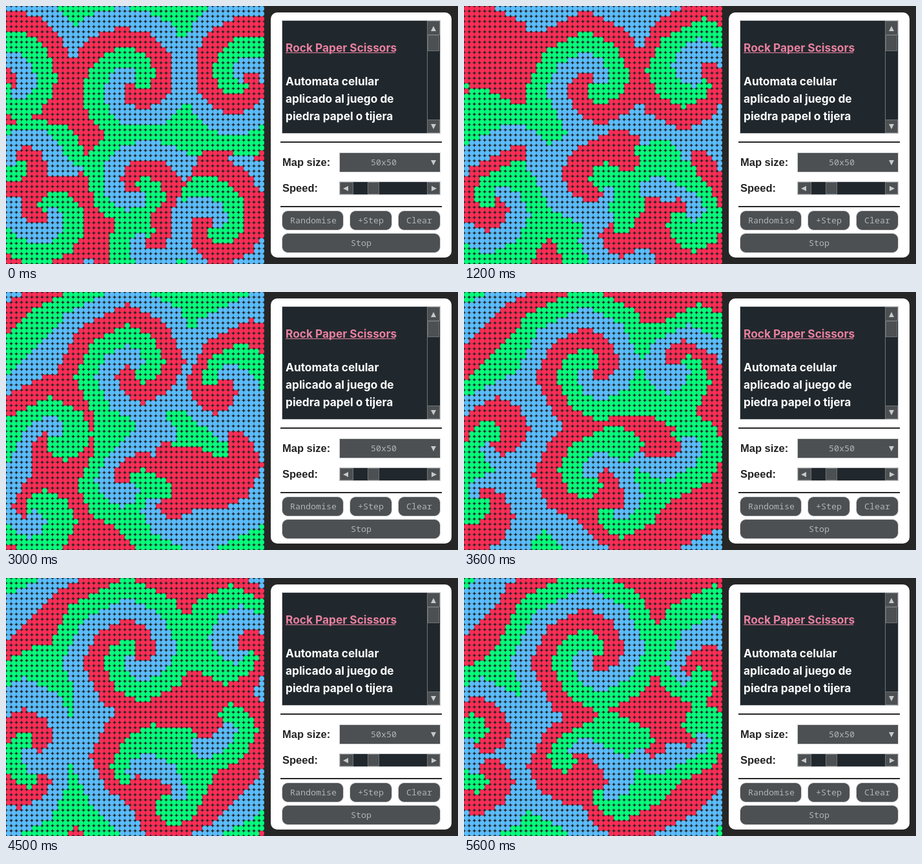
An HTML page with a canvas that plays this animation: 700x400 px, repeating every 5.7 s.

```html
<!DOCTYPE html>
<html lang="es">
<head>
<meta charset="utf-8">
<title>Rock Paper Scissors</title>
<style>
  html, body { margin: 0; width: 100%; height: 100%; overflow: hidden; background: #262626; }
  canvas, svg { position: absolute; left: 0; top: 0; display: block; }
  .pane { fill: #21282d; stroke: #c4c6c8; }
  .part { fill: #4c5052; stroke: #707476; }
  .button { fill: #4c5052; stroke: #d2d4d5; }
  .arrow { fill: #c6c8c9; }
  .rule { fill: #262626; }
  .about { font: 700 17.3px Inter, sans-serif; fill: #fff; }
  .link { fill: #e8809f; }
  .label { font: 700 16.5px "Liberation Sans", Arial, sans-serif; fill: #222; }
  .mono { font: 13.33px "Noto Sans Mono", monospace; fill: #b0b4b6; }
  .mid { text-anchor: middle; }
</style>
</head>
<body>
<canvas id="board" width="400" height="400"></canvas>
<svg width="700" height="400" viewBox="0 0 700 400">
  <rect x="410" y="10" width="280" height="380" rx="10" fill="#fff"/>

  <rect class="pane" x="427.5" y="22.5" width="245" height="175"/>
  <g class="about">
    <text class="link" x="433" y="71">Rock Paper Scissors</text>
    <rect class="link" x="433" y="72" width="170" height="1"/>
    <text x="433" y="123">Automata celular</text>
    <text x="433" y="150">aplicado al juego de</text>
    <text x="433" y="177">piedra papel o tijera</text>
  </g>
  <path d="M652.5 23V197" stroke="#707476"/>
  <rect class="part" x="652.5" y="23.5" width="19" height="21"/>
  <rect class="part" x="653.5" y="45.5" width="17" height="24"/>
  <rect class="part" x="652.5" y="176.5" width="19" height="20"/>
  <path class="arrow" d="M658 39h8l-4-8zM658 183h8l-4 8z"/>

  <rect class="rule" x="425" y="210" width="250" height="2"/>
  <text class="label" x="428" y="248">Map size:</text>
  <rect class="button" x="516.5" y="227.5" width="156" height="30"/>
  <text class="mono mid" x="585" y="247">50x50</text>
  <path class="arrow" d="M658 239h8l-4 8z"/>

  <text class="label" x="428" y="288">Speed:</text>
  <rect class="pane" x="516.5" y="272.5" width="156" height="20"/>
  <rect class="part" x="517.5" y="273.5" width="20" height="18"/>
  <rect class="part" x="560.5" y="273.5" width="17" height="18"/>
  <rect class="part" x="652.5" y="273.5" width="19" height="18"/>
  <path class="arrow" d="M530 279v8l-8-4zM659 279v8l8-4z"/>

  <rect class="rule" x="425" y="310" width="250" height="2"/>
  <rect class="button" x="427.5" y="317.5" width="95" height="30" rx="9"/>
  <rect class="button" x="532.5" y="317.5" width="65" height="30" rx="9"/>
  <rect class="button" x="607.5" y="317.5" width="65" height="30" rx="9"/>
  <rect class="button" x="427.5" y="352.5" width="245" height="30" rx="9"/>
  <clipPath id="fit"><rect x="438" y="318" width="73" height="29"/></clipPath>
  <g class="mono">
    <text x="440" y="337" clip-path="url(#fit)">Randomise</text>
    <text class="mid" x="565" y="337">+Step</text>
    <text class="mid" x="640" y="337">Clear</text>
    <text class="mid" x="550" y="372">Stop</text>
  </g>
</svg>
<script>
const SIZE = 50, CELL = 8;
const COLORS = ['#fa2d55', '#05fc7b', '#5abcfc'];
const TICK = 100, LOOP = 5700, PAUSE = 2400, RESUME = 3000;
const RATE = 2.5;        // generations per tick
const WAVELENGTH = 12;   // cells between two fronts of one colour

// Spiral centres in cells, sense of rotation, phase in turns.
const SPIRALS = [
  { x: 24.75, y: 15, spin: -1, phase: 0.62 },
  { x: 46, y: 14.3, spin: 1, phase: 0.28 },
  { x: 25.6, y: 35.6, spin: 1, phase: 0.72 },
  { x: 27, y: 45, spin: -1, phase: 0.4 },
  { x: 40, y: 42.5, spin: -1, phase: 0.85 },
  { x: 8, y: 40, spin: 1, phase: 0.9 },
  { x: 2.5, y: 30, spin: 1, phase: 0.42 },
  { x: 1, y: 16, spin: -1, phase: 0.03 }
];

// Blend the waves of all spirals; the nearest one dominates.
function seedCell(x, y) {
  let re = 0, im = 0;
  for (const s of SPIRALS) {
    const dx = x - s.x, dy = y - s.y, r = Math.hypot(dx, dy);
    const angle = s.spin * Math.atan2(dy, dx) + 2 * Math.PI * (s.phase - r / WAVELENGTH);
    const weight = Math.exp(-r / 1.5);
    re += weight * Math.cos(angle);
    im += weight * Math.sin(angle);
  }
  const turn = Math.atan2(im, re) / (2 * Math.PI) + 1;
  return Math.floor(turn * 3) % 3;
}

function seed() {
  return Uint8Array.from({ length: SIZE * SIZE },
    (_, i) => seedCell(i % SIZE + 0.5, Math.floor(i / SIZE) + 0.5));
}

// A cell yields when three or more neighbours beat it.
function evolve(grid) {
  return grid.map((state, i) => {
    const x = i % SIZE, y = Math.floor(i / SIZE), rival = (state + 1) % 3;
    let count = 0;
    for (let v = Math.max(0, y - 1); v <= Math.min(SIZE - 1, y + 1); v++)
      for (let u = Math.max(0, x - 1); u <= Math.min(SIZE - 1, x + 1); u++)
        if (grid[v * SIZE + u] === rival) count++;
    return count >= 3 ? rival : state;
  });
}

const history = [seed()];
while (history.length <= LOOP / TICK * RATE) history.push(evolve(history.at(-1)));

const ctx = document.getElementById('board').getContext('2d');
let shown = null;

function draw(grid) {
  ctx.fillStyle = '#262626';
  ctx.fillRect(0, 0, 400, 400);
  COLORS.forEach((color, state) => {
    ctx.fillStyle = color;
    ctx.beginPath();
    grid.forEach((s, i) => {
      if (s !== state) return;
      const x = (i % SIZE + 0.5) * CELL, y = (Math.floor(i / SIZE) + 0.5) * CELL;
      ctx.moveTo(x + CELL / 2, y);
      ctx.arc(x, y, CELL / 2, 0, Math.PI * 2);
    });
    ctx.fill();
  });
}

const origin = performance.now();
function frame() {
  let t = (performance.now() - origin) % LOOP;
  if (t > PAUSE && t < RESUME) t = PAUSE;
  const grid = history[Math.floor(Math.floor(t / TICK) * RATE)];
  if (grid !== shown) draw(shown = grid);
  requestAnimationFrame(frame);
}
frame();
</script>
</body>
</html>
```
